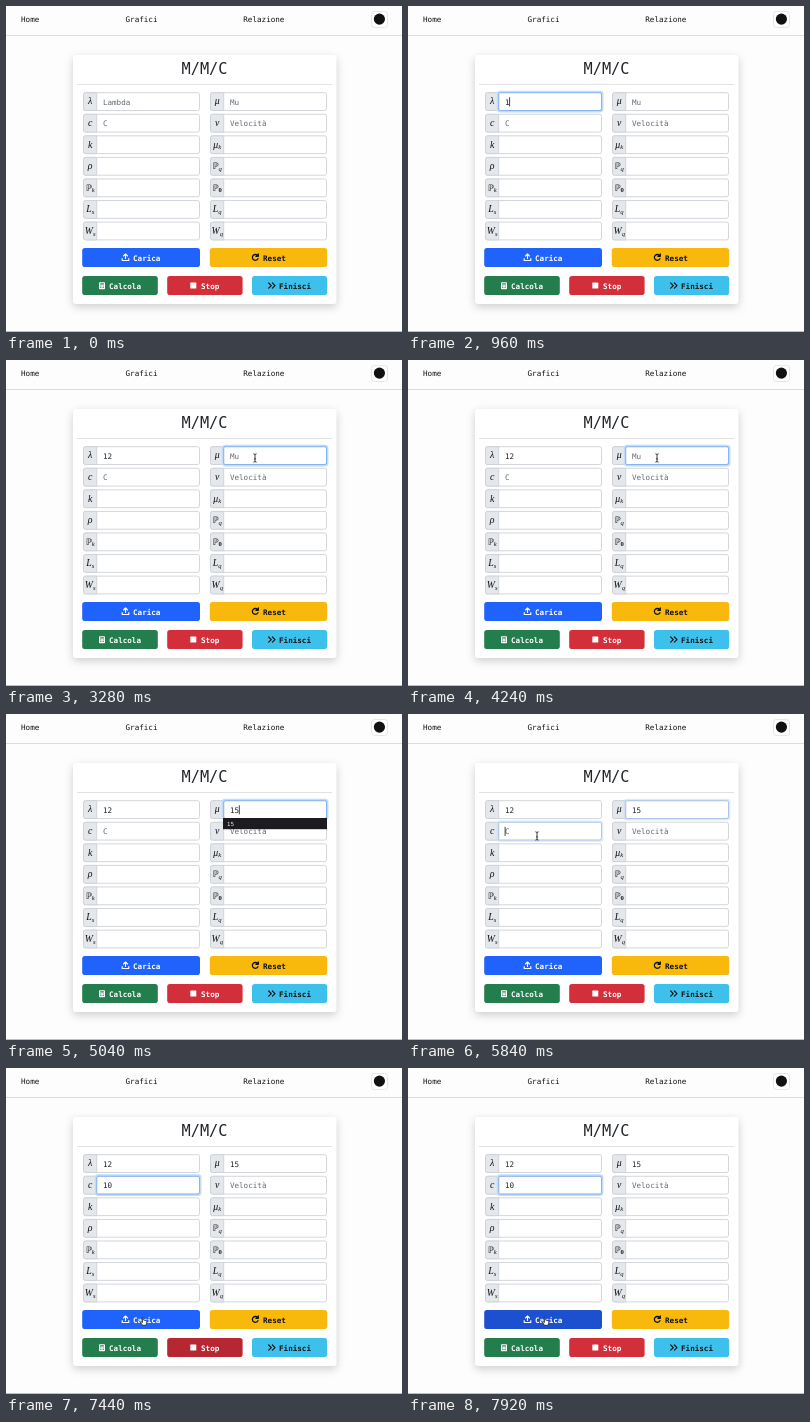
An HTML page for the animation above (8000 ms loop, 396 by 326 pixels).

```html
<!DOCTYPE html>
<html lang="it">
<head>
<meta charset="utf-8">
<title>M/M/C</title>
<style>
html, body { margin: 0; width: 100%; height: 100%; overflow: hidden; background: #fdfdfd; }
svg { display: block; width: 396px; height: 326px; }
text { font: 7.6px "DejaVu Sans Mono", "Liberation Mono", monospace; fill: #111; white-space: pre; }
.title { font-size: 15.3px; fill: #212529; }
.bold { font-weight: 700; }
.math { font: italic 9.8px "Liberation Serif", "Noto Serif", serif; }
.board { font: 8.6px "DejaVu Sans", "DejaVu Serif", sans-serif; }
.sub { font-size: 6.6px; }
.option { font: 5.6px "DejaVu Sans", sans-serif; fill: #eee; }
.card { filter: drop-shadow(0 3px 4px rgba(0,0,0,.19)); }
</style>
</head>
<body>
<svg id="stage" viewBox="0 0 396 326"></svg>
<script>
const LOOP = 8000, FADE = 150;
const stage = document.getElementById('stage');

function add(tag, attrs, content = '') {
  const el = document.createElementNS('http://www.w3.org/2000/svg', tag);
  for (const key in attrs) el.setAttribute(key, attrs[key]);
  el.textContent = content;
  stage.appendChild(el);
  return el;
}
const rect = (x, y, width, height, fill, more = {}) => add('rect', { x, y, width, height, fill, ...more });
const text = (x, y, content, more = {}) => add('text', { x, y, ...more }, content);
const path = (d, more = {}) => add('path', { d, ...more });
const show = (el, on) => el.setAttribute('visibility', on ? 'visible' : 'hidden');
const clamp = v => Math.min(1, Math.max(0, v));
const ease = v => v * v * (3 - 2 * v);
const fade = (t, start, end = Infinity) => ease(clamp((t - start) / FADE)) - ease(clamp((t - end) / FADE));

// Page and card
text(15, 16, 'Home');
text(119.5, 16, 'Grafici');
text(237.3, 16, 'Relazione');
rect(365.5, 5.5, 16, 16, '#fff', { rx: 3, stroke: '#e6e6e9' });
add('circle', { cx: 373.4, cy: 13.1, r: 5.6, fill: '#111' });
rect(0, 29, 396, 1, '#dcdcdc');
rect(0, 325, 396, 1, '#c0c0c0');
rect(67, 49, 263.5, 249, '#fff', { rx: 3, class: 'card' });
text(198.5, 68, 'M/M/C', { class: 'title', 'text-anchor': 'middle' });
rect(71, 78, 255, 1, '#e2e2e4');

// Form fields
const columns = [
  { x: 77.5, labels: ['λ', 'c', 'k', 'ρ', 'ℙk', 'Ls', 'Ws'], hints: ['Lambda', 'C'] },
  { x: 204.5, labels: ['μ', 'v', 'μk', 'ℙq', 'ℙ0', 'Lq', 'Wq'], hints: ['Mu', 'Velocità'] }
];
const rowTop = row => 86.7 + row * 21.57;

function label(cx, y, name) {
  const el = text(cx, y, name[0], { class: 'math', 'text-anchor': 'middle' });
  if (name[0] === 'ℙ') el.classList.add('board');
  if (!name[1]) return;
  const sub = document.createElementNS(el.namespaceURI, 'tspan');
  sub.setAttribute('class', 'math sub');
  if (name[1] === '0') sub.setAttribute('style', 'font-style:normal;font-weight:700');
  sub.setAttribute('dy', 1.7);
  sub.textContent = name[1];
  el.appendChild(sub);
}

const fields = columns.map(({ x, labels, hints }) => labels.map((name, row) => {
  const y = rowTop(row), right = x < 100 ? 193.5 : 320.5;
  rect(x, y, right - x, 17.8, '#fff', { rx: 2, stroke: '#ced2d7', 'stroke-width': .9 });
  path(`M${x + 13.2} ${y}h-11.2q-2 0 -2 2v13.8q0 2 2 2h11.2z`,
    { fill: '#e4e7eb', stroke: '#ced2d7', 'stroke-width': .9 });
  label(x + 6.7, y + 11.7, name);
  return { x, y, right, hint: hints[row] || '', value: text(x + 19.4, y + 11.8, '') };
}));

// Buttons
function button(x, y, width, fill, textX, caption, ink) {
  const el = rect(x, y, width, 19, fill, { rx: 2.8 });
  text(textX, y + 12.5, caption, { class: 'bold', style: `fill:${ink}` });
  return el;
}
const load = button(76.2, 242, 117.8, '#2063fc', 127, 'Carica', '#fff');
button(203.8, 242, 117.4, '#f8b80c', 257, 'Reset', '#111');
button(76.2, 270, 75.6, '#247d4c', 103, 'Calcola', '#fff');
const stop = button(161.2, 270, 75.4, '#d32f3b', 195, 'Stop', '#fff');
button(246, 270, 75.2, '#3dc1ec', 273, 'Finisci', '#111');

const line = { fill: 'none', 'stroke-width': 1.1, 'stroke-linecap': 'round', 'stroke-linejoin': 'round' };
path('M119.5 252.5v-4.3m-2 1.8l2-2l2 2M116.2 252.6v1.9h6.6v-1.9', { ...line, stroke: '#fff' });
path('M251.5 249.5a2.9 2.9 0 1 0 .4 3.2M252.3 247.9v2.4h-2.4', { ...line, stroke: '#111', 'stroke-width': 1.3 });
rect(93, 276.2, 6, 7, '#fff', { rx: .8 });
rect(94.1, 277.3, 3.8, 1.2, '#247d4c');
for (let i = 0; i < 6; i++) rect(94.1 + i % 3 * 1.5, 279.5 + Math.floor(i / 3) * 1.6, .8, .9, '#247d4c');
rect(184.3, 276.6, 6, 6, '#fff', { rx: .7 });
path('M262.7 277l2.6 2.6l-2.6 2.6M266.4 277l2.6 2.6l-2.6 2.6', { ...line, stroke: '#111', 'stroke-width': 1.2 });

// Focus, typing and pointer
const entries = [
  { field: fields[0][0], focus: 800, blur: 2640, value: '12', keys: [960, 1080] },
  { field: fields[1][0], focus: 2640, blur: 5770, value: '15', keys: [4280, 4600] },
  { field: fields[0][1], focus: 5770, blur: Infinity, value: '10', keys: [6260, 6480], caretEnd: 6980 }
];
for (const entry of entries) {
  const { x, y, right } = entry.field, width = right - x - 13.2;
  entry.ring = add('g', {});
  entry.ring.append(
    rect(x + 12.2, y - 1, width + 2, 19.8, 'none', { rx: 2.5, stroke: '#c2dbfb', 'stroke-width': 1.9 }),
    rect(x + 13.2, y, width, 17.8, 'none', { rx: 1.5, stroke: '#86b5f4', 'stroke-width': 1 }));
  entry.caret = rect(0, y + 4.6, .8, 9, '#111');
}
const menu = add('g', {});
menu.append(rect(217, 104, 104, 11.2, '#1c1c20'), text(221, 111.8, '15', { class: 'option' }));

const beam = path('M-1.6 -4.2q1.6 0 1.6 1v6.4q0 1 -1.6 1M1.6 -4.2q-1.6 0 -1.6 1M1.6 4.2q-1.6 0 -1.6 -1M-.9 .9h1.8',
  { fill: 'none', stroke: '#111', 'stroke-width': .8 });
const hand = path('M-.6 -3.5q.7 -.7 1.3 0v2.6q2.9 .1 3.1 1.5q.1 2 -1 3.7h-3.2q-1.2 -1.8 -2.4 -3.3q.4 -1 2.2 .5z',
  { fill: '#fff', stroke: '#111', 'stroke-width': .7 });
const arrow = path('M0 0v7.5l1.8 -1.6l1.2 2.7l1.2 -.5l-1.2 -2.7h2.4z',
  { fill: '#111', stroke: '#fff', 'stroke-width': .6 });

const moves = [
  { from: 2100, to: 2560, hide: 4280, path: [[140, 98], [249, 98]] },
  { from: 5160, to: 5680, hide: 6260, path: [[249, 98], [129, 122]] },
  { from: 6760, to: 7220, hide: 7260, path: [[129, 122], [196, 278]] },
  { from: 7260, to: 7440, hide: LOOP, path: [[196, 278], [137, 253]] }
];

function drawPointer(t) {
  const move = moves.find(m => t >= m.from && t < m.hide);
  let shape = null;
  if (move) {
    const k = ease(clamp((t - move.from) / (move.to - move.from)));
    const [a, b] = move.path;
    const x = a[0] + (b[0] - a[0]) * k, y = a[1] + (b[1] - a[1]) * k;
    const overField = fields.flat().some(f => x > f.x + 13 && x < f.right && y > f.y && y < f.y + 18);
    const overButton = (y > 242 && y < 261 && x < 194) || (y > 270 && y < 289 && x > 161);
    shape = overField ? beam : overButton ? hand : arrow;
    shape.setAttribute('transform', `translate(${x} ${y})`);
  }
  for (const el of [beam, hand, arrow]) show(el, el === shape);
}

function mix(a, b, k) {
  return `rgb(${a.map((v, i) => Math.round(v + (b[i] - v) * k))})`;
}

function setValue(field, value) {
  field.value.textContent = value || field.hint;
  field.value.style.fill = value ? '#212529' : '#666a6e';
}
fields.flat().forEach(field => setValue(field, ''));

function draw(t) {
  for (const { field, focus, blur, value, keys, caretEnd = blur, ring, caret } of entries) {
    const typed = keys.filter(key => t >= key).length;
    const lastInput = typed ? keys[typed - 1] : focus;
    setValue(field, value.slice(0, typed));
    ring.setAttribute('opacity', fade(t, focus, blur));
    caret.setAttribute('x', field.x + 19.2 + typed * 4.575);
    show(caret, t >= focus && t < caretEnd && (t - lastInput) % 1000 < 500);
  }
  show(menu, t >= 4600 && t < 5770);
  stop.setAttribute('fill', mix([211, 47, 59], [181, 39, 49], fade(t, 7180, 7420)));
  load.setAttribute('fill', mix([32, 99, 252], [29, 80, 207], fade(t, 7450)));
  drawPointer(t);
}

function tick() {
  draw(performance.now() % LOOP);
  requestAnimationFrame(tick);
}
tick();
</script>
</body>
</html>
```
